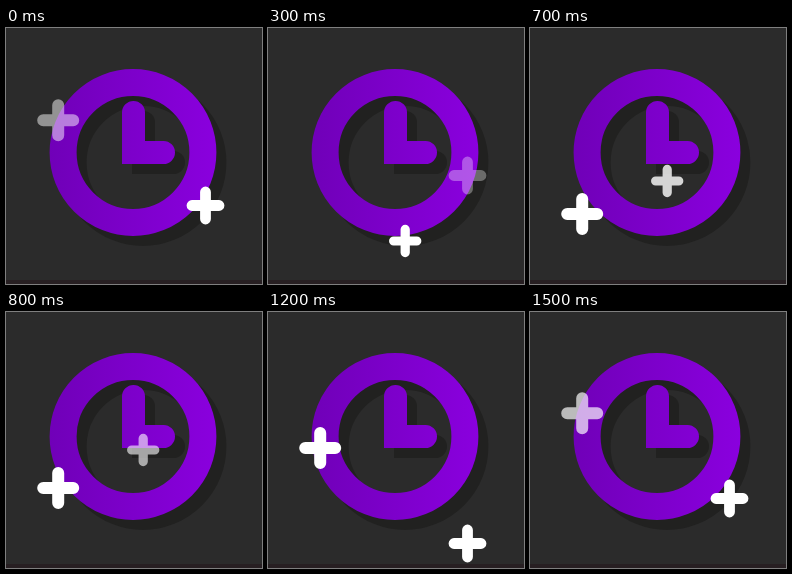
An HTML page for the animation above (1.6 s loop, 256 by 256 pixels).

```html
<!DOCTYPE html>
<html lang="en">
<head>
<meta charset="utf-8">
<title>Clock</title>
<style>
  html, body { margin: 0; width: 100%; height: 100%; overflow: hidden; background: #2b2b2b; }
  svg { display: block; width: 100vw; height: 100vh; }
  .plus { stroke: #fff; stroke-width: 12; stroke-linecap: round; }
</style>
</head>
<body>
<svg viewBox="0 0 256 256" fill="none">
  <defs>
    <linearGradient id="violet" gradientUnits="userSpaceOnUse" x1="44" y1="0" x2="210" y2="0">
      <stop stop-color="#7000b8"/>
      <stop offset="1" stop-color="#8a00de"/>
    </linearGradient>
    <g id="clock">
      <circle cx="127" cy="124.5" r="69.9" stroke-width="27"/>
      <path d="M127.5 84.5V124.5H157.5" stroke-width="23" stroke-linecap="round"/>
    </g>
  </defs>
  <path d="M0 252H256V256H0Z" fill="#271f22"/>
  <use href="#clock" x="10" y="10" stroke="#212120"/>
  <use href="#clock" stroke="url(#violet)"/>
</svg>
<script>
const LOOP = 1600, STEP = 100;
const svg = document.querySelector("svg");

// path: [time, y] points; times past LOOP wrap into the next round.
const pluses = [
  { x: 52.2, size: 1, fade: [1330, 1860],
    path: [[400, 214.5], [500, 206], [1200, 136], [1500, 101.3], [1600, 92.3], [1800, 73]] },
  { x: 137.2, size: 0.77, fade: [600, 1100],
    path: [[300, 213], [1000, 108]] },
  { x: 199.5, size: 0.9, fade: [1700, 2000],
    path: [[1200, 231.5], [1500, 186.5], [1600, 177.5], [1900, 147.5]] }
];

for (const plus of pluses) {
  plus.node = document.createElementNS("http://www.w3.org/2000/svg", "path");
  plus.node.setAttribute("class", "plus");
  plus.node.setAttribute("d", "M-15 0H15M0-15V15");
  svg.append(plus.node);
}

function along(path, time) {
  const next = Math.max(1, path.findIndex(([t]) => t >= time));
  const [t0, y0] = path[next - 1], [t1, y1] = path[next];
  return y0 + (y1 - y0) * (time - t0) / (t1 - t0);
}

function draw(now) {
  const clock = Math.floor(now % LOOP / STEP) * STEP;
  for (const { x, size, fade, path, node } of pluses) {
    const time = clock < path[0][0] ? clock + LOOP : clock;
    const visible = time <= path[path.length - 1][0];
    node.style.display = visible ? "" : "none";
    if (!visible) continue;
    const alpha = (fade[1] - time) / (fade[1] - fade[0]);
    node.setAttribute("opacity", Math.min(1, Math.max(0, alpha)));
    node.setAttribute("transform", `translate(${x} ${along(path, time)}) scale(${size})`);
  }
}

function tick() {
  draw(performance.now());
  requestAnimationFrame(tick);
}
tick();
</script>
</body>
</html>
```
